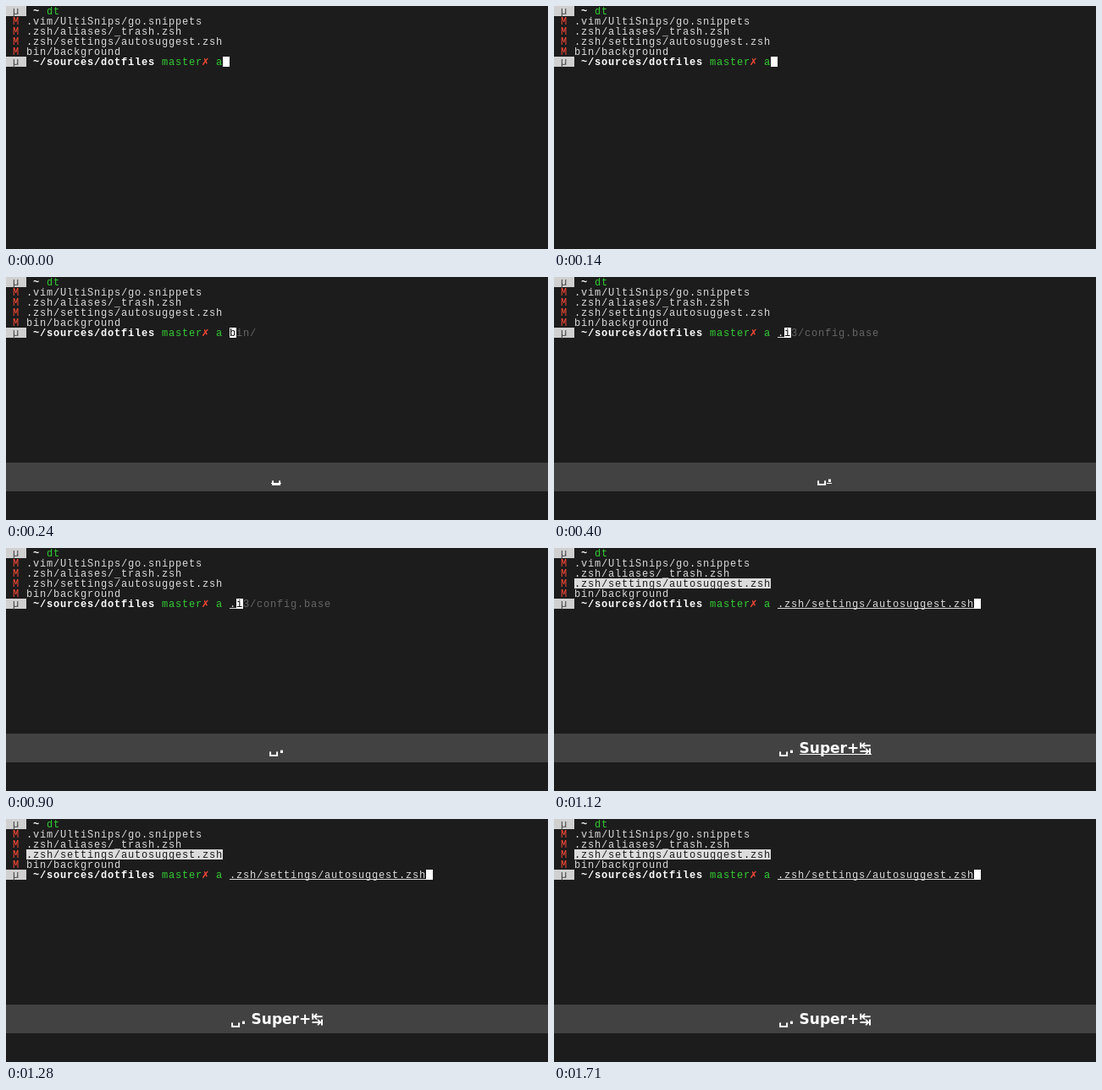
Recreate the animation shown at these times as an HTML page with a canvas. Size 640 px wide and 288 px high, loop 2000 ms.

```html
<!DOCTYPE html>
<html lang="en">
<head>
<meta charset="utf-8">
<style>
html, body { margin: 0; width: 100%; height: 100%; overflow: hidden; background: #1c1c1c; }
canvas { display: block; }
</style>
</head>
<body>
<canvas id="stage" width="640" height="288"></canvas>
<script>
const ctx = document.getElementById('stage').getContext('2d');
const LOOP = 2000, COL = 8, ROW = 12;
const BG = '#1c1c1c', TEXT = '#dcdcdc', WHITE = '#ffffff', GREEN = '#33cc33',
      RED = '#ff4a38', DIM = '#666666', LIGHT = '#d0d0d0', BAR = '#424242';
const MONO = '12px "Liberation Mono", "DejaVu Sans Mono", monospace';
const MARK = '14px "DejaVu Sans Mono", monospace';
const FILES = ['.vim/UltiSnips/go.snippets', '.zsh/aliases/_trash.zsh',
               '.zsh/settings/autosuggest.zsh', 'bin/background'];
const PICK = 2, PROMPT_ROW = 5, ARG_COL = 33;

// typed: path after the command, hint: suggestion under the cursor,
// keys: pressed keys, fresh: the underlined newest part of them
const STEPS = [
  { at: 0, cursor: 32 },
  { at: 240, cursor: 33, hint: 'bin/', keys: '', fresh: '␣' },
  { at: 400, cursor: 34, typed: '.', hint: 'i3/config.base', keys: '␣', fresh: '.' },
  { at: 560, cursor: 34, typed: '.', hint: 'i3/config.base', keys: '␣.', fresh: '' },
  { at: 1120, cursor: 62, typed: FILES[PICK], keys: '␣. ', fresh: 'Super+↹', picked: true },
  { at: 1280, cursor: 62, typed: FILES[PICK], keys: '␣. Super+↹', fresh: '', picked: true }
];

function box(x, y, w, h, color) {
  ctx.fillStyle = color;
  ctx.fillRect(x, y, w, h);
}

// Text on the terminal grid, one character per cell
function put(text, col, row, color, font = MONO) {
  ctx.font = font;
  ctx.textAlign = 'center';
  ctx.fillStyle = color;
  [...text].forEach((c, i) => ctx.fillText(c, (col + i) * COL + 3.5, row * ROW + 10));
}

function cells(col, row, count, color) {
  box(col * COL, row * ROW, count * COL, ROW, color);
}

function prompt(row, path) {
  cells(0, row, 3, LIGHT);
  put('µ', 1, row, '#444444');
  put(path, 4, row, WHITE, 'bold ' + MONO);
}

function drawKeys({ keys, fresh }) {
  box(0, 220, 640, 34, BAR);
  ctx.font = 'bold 17px "DejaVu Sans", sans-serif';
  ctx.textAlign = 'left';
  const all = keys + fresh;
  const x = Math.floor(320 - ctx.measureText(all).width / 2);
  ctx.fillStyle = WHITE;
  ctx.fillText(all, x, 243);
  if (fresh) {
    const left = Math.round(x + ctx.measureText(keys).width);
    box(left, 244, Math.round(ctx.measureText(fresh).width), 1, WHITE);
  }
}

function draw(step) {
  const { cursor, typed = '', hint = '', picked } = step;
  box(0, 0, 640, 288, BG);
  prompt(0, '~');
  put('dt', 6, 0, GREEN);

  FILES.forEach((name, i) => {
    const on = picked && i === PICK;
    put('M', 1, i + 1, RED);
    if (on) cells(3, i + 1, name.length, TEXT);
    put(name, 3, i + 1, on ? BG : TEXT);
  });

  prompt(PROMPT_ROW, '~/sources/dotfiles');
  put('master', 23, PROMPT_ROW, GREEN);
  put('✗', 29, PROMPT_ROW, RED, MARK);
  put('a', 31, PROMPT_ROW, GREEN);
  put(typed, ARG_COL, PROMPT_ROW, TEXT);
  box(ARG_COL * COL, PROMPT_ROW * ROW + 11, typed.length * COL, 1, TEXT);
  cells(cursor, PROMPT_ROW, 1, WHITE);
  put(hint.slice(0, 1), cursor, PROMPT_ROW, '#000000');
  put(hint.slice(1), cursor + 1, PROMPT_ROW, DIM);

  if (step.keys !== undefined) drawKeys(step);
}

const start = performance.now();
function tick() {
  const t = (performance.now() - start) % LOOP;
  draw(STEPS.findLast(s => s.at <= t));
  requestAnimationFrame(tick);
}
tick();
</script>
</body>
</html>
```
